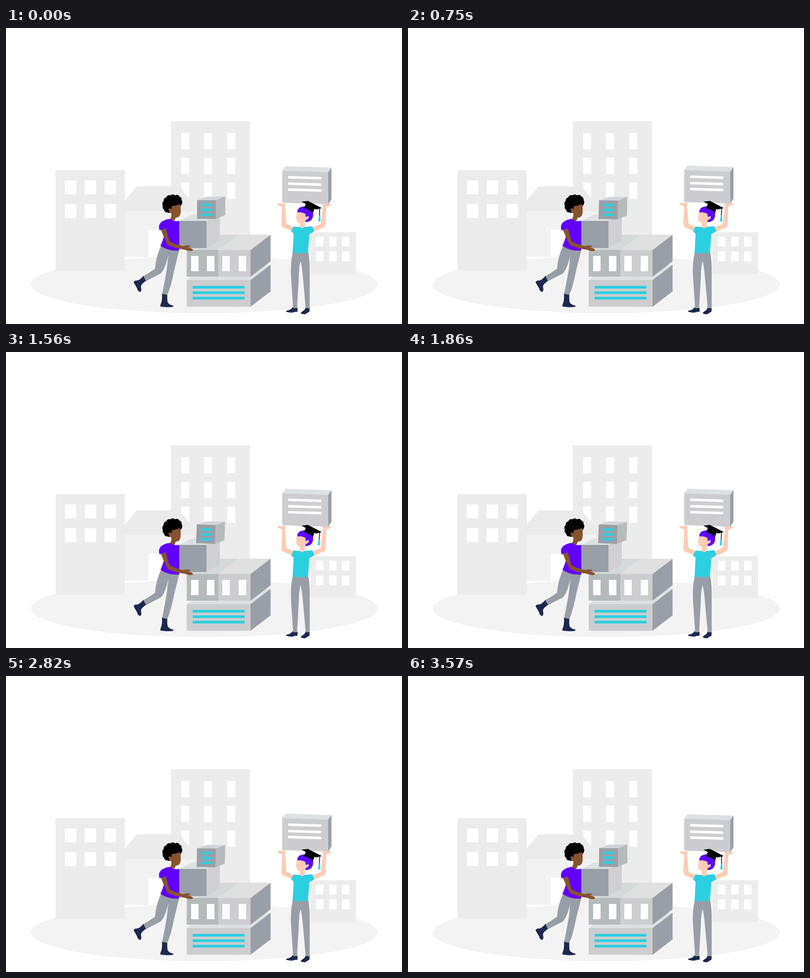
Write an HTML page that moves like this. It is 800 by 600 pixels and loops after 3.6 s.

```html
<!DOCTYPE html>
<html lang="en">
<head>
<meta charset="utf-8">
<title>Campus builders</title>
<style>
  html, body { margin: 0; width: 100%; height: 100%; overflow: hidden; background: #fff; }
  svg { display: block; width: 800px; height: 600px; }
  .wall { fill: #ececec; }
  .white { fill: #fff; }
  .front { fill: #cdcdcf; }
  .side { fill: #999fa8; }
  .top { fill: #dde1e2; }
  .dim { fill: #b5baba; }
  .cyan { fill: #2ccfe0; }
  .violet { fill: #6200ff; }
  .pants { fill: #989ea7; }
  .brown { fill: #87522e; }
  .peach { fill: #ffcbb4; }
  .shoe { fill: #1d2850; }
  .label { stroke: #fff; stroke-width: 5; }
</style>
</head>
<body>
<svg viewBox="0 0 800 600">
  <ellipse cx="400.5" cy="520" rx="350.5" ry="58" fill="#f3f3f3"/>

  <g id="town">
    <path class="wall" d="M100 288H240V492H100Z"/>
    <path class="wall" d="M333 189H493V450H333Z"/>
    <path class="wall" d="M615 414H707V498H615Z"/>
    <g id="windows" class="white"></g>
    <path fill="#f2f2f2" d="M240 371H380V464H240Z"/>
    <path class="white" d="M288 409H345V464H288Z"/>
    <path fill="#ebebeb" d="M264 321H350L392 371H222Z"/>
  </g>

  <g id="blocks">
    <path class="top" d="M365 511L405 480H534L494 511Z"/>
    <path class="front" d="M365 511H494V565H365Z"/>
    <path class="side" d="M494 511L534.500 480V534L494 565Z"/>
    <path class="cyan" d="M377 522.700H482V528.200H377ZM377 533.700H482V539.200H377ZM377 544.700H482V550.200H377Z"/>
    <path fill="#d4d9d9" d="M365 450L405 419H470L429 450Z"/>
    <path fill="#e0e0e1" d="M429 450L470 419H534L494 450Z"/>
    <path class="dim" d="M365 450H429V504H365Z"/>
    <path class="front" d="M429 450H494V504H429Z"/>
    <path class="side" d="M494 450L534.500 419V473L494 504Z"/>
    <path class="white" d="M374 462H389V493H374ZM406 462H421V493H406ZM437 462H452V493H437ZM470 462H485V493H470Z"/>
    <path class="top" d="M350 391L375 378H432L405 391Z"/>
    <path class="side" d="M350 391H405V446H350Z"/>
    <path fill="#d0d0d2" d="M405 391L432 378V431L405 446Z"/>
  </g>

  <g id="cube">
    <path fill="#d2d5d7" d="M386 349L405 342L443 341.500L424 349Z"/>
    <path class="side" d="M386 349H424V387H386Z"/>
    <path class="dim" d="M424 349L443 341.500V379L424 387Z"/>
    <path class="cyan" d="M395 356H415.500V361H395ZM395 366H415.500V371H395ZM395 376H415.500V381H395Z"/>
  </g>

  <g id="carrier">
    <path class="shoe" d="M278 502L283.500 512Q273 519 272.500 524Q275 533 271 535Q266 534 265 528Q261 521 258 516Q258 512 263 512Q270 512 278 502Z"/>
    <path class="shoe" d="M315 538L326 540Q325 551 327 557Q332 562 338 562.500V565Q326 567 311.500 564.500Q312 560 314 556Q316 548 315 538Z"/>
    <path class="pants" d="M313 442L350 450Q345 470 340 490Q334 522 326 541L315.500 539Q321 512 325 488L328 460Q321 491 312 498Q298 505 283 513L277.500 503Q290 496 301 488Q303 463 313 442Z"/>
    <path class="brown" d="M334 375L344 381L341 389Q338 395 331 388Q335 383 334 375Z"/>
    <path class="violet" d="M331 387Q338 393 350 391V451Q329 453 312 441.500Q320 424 322 408L310 410Q307 400 313 394Q320 388 331 387Z"/>
    <path stroke="#000" stroke-width="1.300" d="M335 371Q331 376 326 373Q321 374 320 368Q316 365 317.500 360Q315 355 319 351Q319 345 324 344Q327 338 332 340Q337 336 341 340Q347 337 350 342Q355 344 354 349Q357 353 354 358L349 366Z"/>
    <path class="brown" d="M335 361Q344 360 352 357Q354 370 352 378Q350 385 342 384Q336 381 334 376Q328 373 328.500 367Q331 363 334 368Z"/>
    <path class="brown" d="M313 409L323 406L330 432Q345 440 358 442Q365 440 372 441L372 443L367 444.500Q376 446 378 450Q376 453 370 452Q362 449 355 448.500Q340 446 327 439.500Q322 432 313 409Z"/>
  </g>

  <g id="arms" class="peach">
    <path d="M548.500 357Q552 354 557 356L564 355Q565 357 563.500 362L566.500 397L583 405L579 412L559 404Q556 402 556.500 397L558 363Q554 360 549 359Z"/>
    <path d="M656.500 357Q652 354 648 357L639 356L640.500 363L636 397L618 405L623 412L643 404Q646 402 645.500 397L647 363Q652 361 656 359Z"/>
  </g>

  <g id="crate">
    <path class="top" d="M565 280L657.500 283L651 292L558 289Z"/>
    <path class="front" d="M558 289L651 292V357L558 354Z"/>
    <path class="side" d="M651 292L657.500 283V347L651 357Z"/>
    <path class="label" d="M570 302.500L637 304.500M570 315.500L637 317.500M570 327.500L637 329.500"/>
  </g>

  <g id="graduate">
    <path class="shoe" d="M579 566L589 567V575Q584 575 578 577Q571 577 566 575V573Q575 572 579 566Z"/>
    <path class="shoe" d="M605 566L613.500 567L613 575Q609 577 605 580Q600 581 595 578Q597 575 601 573Q605 570 605 566Z"/>
    <path class="pants" d="M579 455H611Q614 474 613.500 495L613.500 568H605.500L600 507Q598 482 595 473Q592 482 591.500 507L588 568H580L576 507Q574 479 579 455Z"/>
    <path class="cyan" d="M581 402Q588 404 594 403Q598 408 603 403L619 402L623 412L613 418L610 456H579L581 417L576 412Z"/>
    <path class="peach" d="M594 390L604 389L603 403Q599 408 594 404Z"/>
    <path fill="#5d09fb" d="M588.500 374Q588 367 594 363.500Q603 360 612 363Q622 368 620.500 380Q619 393 605 393.500L603 378Z"/>
    <path class="peach" d="M588 374Q597 372 605 377Q605 386 608 382Q610 380 612 383Q611 388 606 389Q604 396 595 396Q586 394 586 383Z"/>
    <path d="M606 356L624 364L620 375Q612 367 602 365Z"/>
    <path d="M597 352L610 350.500L638 365L626 368Z"/>
  </g>

  <g id="tassel">
    <path d="M633.500 365V381" stroke="#000" stroke-width="1.500"/>
    <path class="cyan" d="M632 380H635L635.500 392H631Z"/>
  </g>
</svg>
<script>
  const byId = id => document.getElementById(id);

  // Each grid: column starts, row starts, pane width, pane height.
  const grids = [
    [[119, 159, 199], [309, 357], 23, 28],
    [[354, 400, 447], [213, 263, 313], 16, 33],
    [[626, 653, 679], [423, 453], 15, 20]
  ];
  for (const [xs, ys, width, height] of grids)
    for (const x of xs)
      for (const y of ys) {
        const pane = document.createElementNS('http://www.w3.org/2000/svg', 'rect');
        Object.entries({ x, y, width, height }).forEach(([k, v]) => pane.setAttribute(k, v));
        byId('windows').append(pane);
      }

  // Part, pivot, rest pose, far pose.
  const moves = [
    ['cube', '375px 335px', 'rotate(0deg)', 'rotate(2.3deg)'],
    ['crate', '0 0', 'translateY(0px)', 'translateY(-3px)'],
    ['arms', '600px 403px', 'scaleY(1)', 'scaleY(1.065)'],
    ['tassel', '633.5px 365px', 'rotate(0deg)', 'rotate(3deg)']
  ];
  for (const [id, pivot, rest, far] of moves) {
    const part = byId(id);
    part.style.transformOrigin = pivot;
    part.animate({ transform: [rest, far] }, {
      duration: 1800,
      easing: 'cubic-bezier(.33, 0, .67, 1)',
      direction: 'alternate',
      iterations: Infinity
    }).startTime = 0;
  }
</script>
</body>
</html>
```
